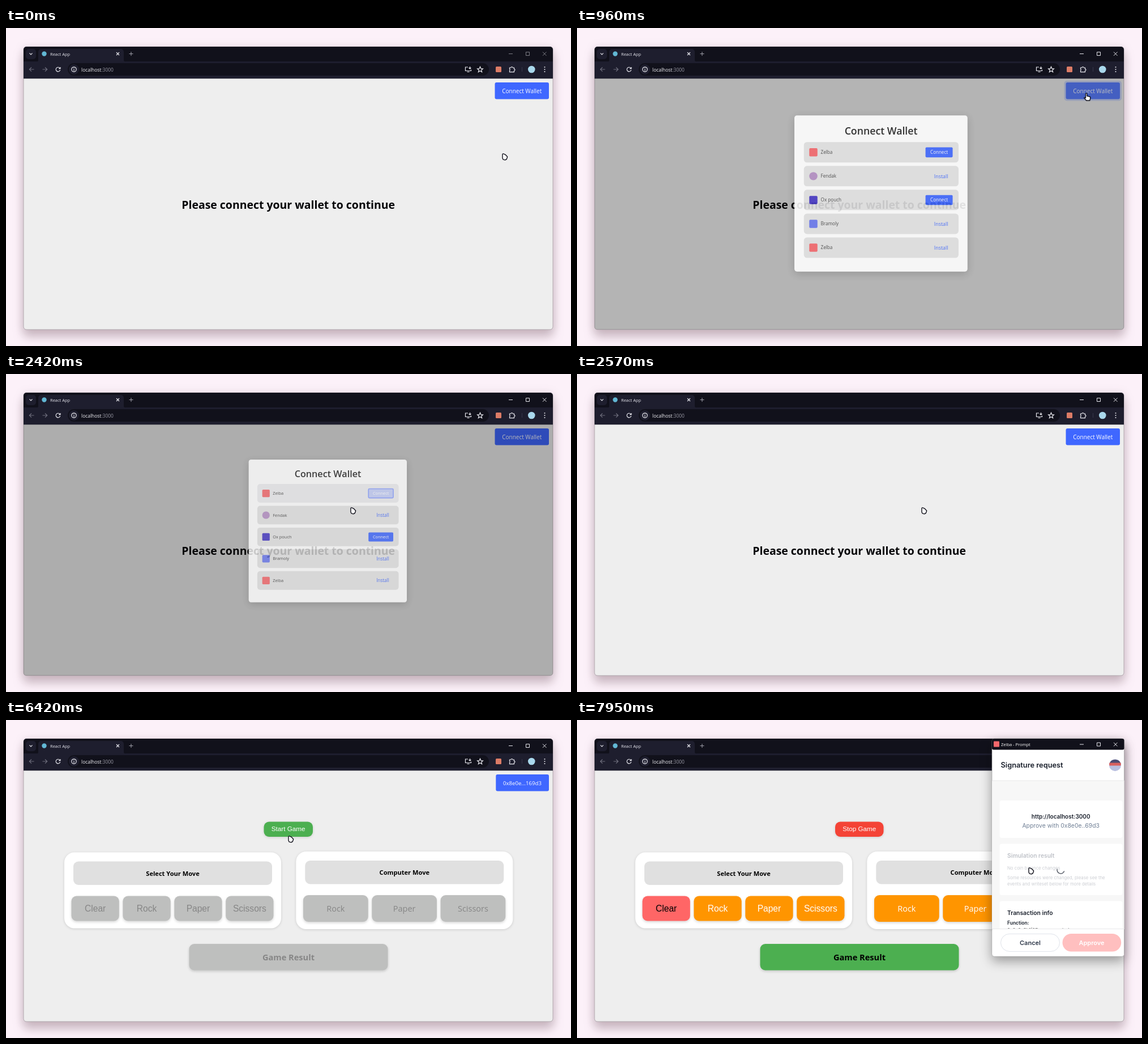
An HTML page for the animation above (8000 ms loop, 998x561 px).

```html
<!DOCTYPE html>
<html lang="en">
<head>
<meta charset="utf-8">
<title>Wallet game demo</title>
<style>
html, body { margin: 0; width: 100%; height: 100%; overflow: hidden; background: #fcf1f9; }
svg { display: block; width: 998px; height: 561px; }
text { font-family: "Open Sans", "Noto Sans", sans-serif; white-space: pre; }
.mid { text-anchor: middle; }
.bold { font-weight: 700; }
.semi { font-weight: 600; }
.arial { font-family: "Liberation Sans", Arial, sans-serif; }
#popup text { font-family: Inter, sans-serif; }
#popup .caption { font-family: "Open Sans", sans-serif; }
.line { fill: none; stroke: #e8e8ee; stroke-width: 1.2; }
.window { filter: drop-shadow(0 12px 9px rgba(80, 45, 60, .27)) drop-shadow(0 1px 8px rgba(70, 50, 60, .1)); }
.float { filter: drop-shadow(0 8px 10px rgba(0, 0, 0, .36)); }
.dialog { filter: drop-shadow(0 4px 8px rgba(0, 0, 0, .2)); }
.card { filter: drop-shadow(0 1px 2px rgba(0, 0, 0, .14)); }
.key { fill: #bebfbe; filter: drop-shadow(0 2px 2px rgba(0, 0, 0, .16)); }
.label { fill: #868686; }
.on .move { fill: #ff9500; }
.on .clear { fill: #ff6666; }
.on .result { fill: #4caf50; }
.on .label { fill: #fff; }
.on .dark { fill: #000; }
</style>
</head>
<body>
<svg id="stage" viewBox="0 0 998 561"></svg>
<script>
const BLUE = '#3f67ff';
const box = (x, y, w, h, r, fill, more = '') =>
  `<rect x="${x}" y="${y}" width="${w}" height="${h}" rx="${r}" fill="${fill}" ${more}/>`;
const text = (x, y, size, str, fill, cls = '', more = '') =>
  `<text x="${x}" y="${y}" font-size="${size}" fill="${fill}" class="${cls}" ${more}>${str}</text>`;
const path = (d, more = '') => `<path class="line" d="${d}" ${more}/>`;
const circle = (x, y, r, fill, more = '') => `<circle cx="${x}" cy="${y}" r="${r}" fill="${fill}" ${more}/>`;
const group = (id, ...parts) => `<g id="${id}">${parts.join('')}</g>`;

const controls = y => path(`M888 ${y}h7M918.5 ${y - 3}h6v6h-6zM948 ${y - 3.2}l6.5 6.5m0-6.5l-6.5 6.5`, 'style="stroke-width:1"');
const contentShape = 'M31 89H966V527a5 5 0 0 1-5 5H36a5 5 0 0 1-5-5Z';

const browser = [
  box(31, 33, 935, 499, 5, '#eee', 'class="window" stroke="#a59ca3" stroke-width=".8"'),
  '<path d="M31 60V38a5 5 0 0 1 5-5H961a5 5 0 0 1 5 5V60Z" fill="#11111b"/>',
  box(31, 59, 935, 30.3, 0, '#1e1e2e'),
  box(35, 37, 18, 18, 5, '#1e1e2e'),
  path('M41.5 44.3l2.5 2.5 2.5-2.5'),
  '<path d="M53 60q4 0 4-4V42a5 5 0 0 1 5-5H203a5 5 0 0 1 5 5V56q0 4 4 4Z" fill="#1e1e2e"/>',
  circle(67.5, 45.5, 4.2, '#62b8d4'),
  text(78, 48.5, 7.5, 'React App', '#e6e6ee'),
  path('M195 43l5 5m0-5l-5 5'),
  path('M221 42v7m-3.5-3.5h7', 'style="stroke:#a0a0ab;stroke-width:1"'),
  group('controls', controls(45.5)),
  path('M49.5 73h-8m3.5-3.7L41.3 73l3.7 3.7M64.5 73h8m-3.5-3.7l3.7 3.7-3.7 3.7', 'style="stroke:#6f6f7d"'),
  path('M95.3 71.2a3.8 3.8 0 1 0 .4 2.6M96 69v2.7h-2.8'),
  box(109, 62, 744, 22, 11, '#11111b'),
  circle(120, 73, 9, '#1e1e2e'),
  circle(120, 73, 4.2, 'none', 'class="line"'),
  path('M120 72.5v3M120 70.4v1.1'),
  text(133, 76.5, 8.45, 'localhost<tspan fill="#9a9aa6">:3000</tspan>', '#f0f0f5'),
  path('M816 69h-4.5v6.5h10v-2M814.5 77.5h4M819.5 68v4m-2-1.8l2 2 2-2'),
  path('M837.5 68.3l1.4 3.3 3.5.3-2.7 2.3.9 3.5-3.1-1.9-3.1 1.9.9-3.5-2.7-2.3 3.5-.3z'),
  box(865, 68, 10, 10, 1.5, '#dd7c66'),
  path('M889.5 70h2.5a1.5 1.5 0 0 1 3 0h2.5v2.3a1.5 1.5 0 0 1 0 3v2.3h-8v-2.5a1.5 1.5 0 0 0 0-2.6z'),
  path('M911.5 69v8', 'style="stroke:#343447"'),
  circle(928.3, 73, 6.3, '#a9d8ec'),
  [69, 73, 77].map(y => circle(951.5, y, 1, '#e8e8ee')).join('')
];

const welcome = group('welcome',
  group('ring', box(860.5, 93, 101.5, 35.5, 5, '#7f9bff')),
  box(863.5, 96, 95.5, 29.5, 3, BLUE, 'id="connect"'),
  text(911.2, 115, 10, 'Connect Wallet', '#fff', 'mid'),
  text(498.7, 319.3, 19.45, 'Please connect your wallet to continue', '#050508', 'mid bold'));

const wallets = [
  ['Zelba', '#f5686c', true], ['Fendak', '#b58fc4', false], ['Ox pouch', '#4537c4', true],
  ['Bramoly', '#6a78ee', false], ['Zelba', '#f5686c', false]
];
const walletRow = ([name, color, ready], i) => {
  const y = 210 + 46.5 * i;
  return box(348, y, 302, 39.8, 6, '#e3e3e3', `id="row${i}"`) +
    (i === 1 ? circle(366.5, y + 20, 8, color) : box(358.5, y + 12, 16, 16, 2, color)) +
    text(381, y + 23.2, 9, name, '#444') +
    (ready
      ? box(585.5, y + 10.3, 53, 19.5, 2, BLUE, `id="go${i}"`) + text(612, y + 23.2, 8.9, 'Connect', '#fff', 'mid')
      : text(616, y + 23.5, 9.8, 'Install', BLUE, 'mid'));
};
const modal = group('modal',
  box(329.5, 158, 338, 304.5, 5, '#fff', 'class="dialog"'),
  text(498.7, 195, 19.6, 'Connect Wallet', '#222', 'mid semi'),
  ...wallets.map(walletRow));

const key = (x, y, w, h, cls, label, size, font, tone = '') =>
  box(x, y, w, h, 9, '', `class="key ${cls}"`) +
  text(x + w / 2, y + h / 2 + size * .36, size, label, '', `mid label ${font} ${tone}`);
const panel = (x, y, h, title) =>
  box(x, y, 383, h, 18, '#fff', 'class="card"') + box(x + 16, y + 16, 351, 41.5, 9, '#e0e0e0') +
  text(x + 191.5, y + 41.2, 11.1, title, '#000', 'mid bold');
const moves = ['Rock', 'Paper', 'Scissors'];
const game = group('game',
  box(865.3, 96, 93.7, 29.5, 3, BLUE),
  text(912, 115, 9.65, '0x8e0e...169d3', '#fff', 'mid'),
  box(455.5, 179.5, 86.5, 26.5, 9, '#4caf50', 'id="toggle" class="card"'),
  text(498.7, 196.3, 11.7, 'Start Game', '#fff', 'mid arial', 'id="toggleText"'),
  panel(103, 233.5, 134, 'Select Your Move'),
  panel(512.3, 232, 137, 'Computer Move'),
  ...['Clear', ...moves].map((m, i) =>
    key(115.5 + 90.9 * i, 310.5, 84.3, 44, i ? 'move' : 'clear', m, 15.6, 'arial', i ? '' : 'dark')),
  ...moves.map((m, i) => key(525 + 121.3 * i, 309, 114.7, 47, 'move', m, 14.5, '')),
  key(323.5, 395, 351, 46.5, 'result', 'Game Result', 14.6, 'bold', 'dark'));

const faint = '#cdcfd4';
const popup = group('popup',
  box(733, 33, 233.5, 384, 4, '#fff', 'class="float" stroke="#999" stroke-width=".6"'),
  group('caption',
    box(733, 33, 233.5, 19.5, 3, '#11111b'),
    box(736, 37.5, 10, 10, 1, '#f5686c'),
    text(749, 45.6, 7.5, 'Zelba - Prompt', '#fff', 'caption'),
    controls(43)),
  group('sheet',
    box(733, 107, 233.5, 262, 0, '#f7f7f7'),
    box(733, 106.5, 233.5, 1, 0, '#e8e8ea'),
    circle(950.5, 79.7, 10.5, '#b9bfe0'),
    '<path d="M940.5 77a10.5 10.5 0 0 1 20 0z" fill="#4b4a70"/>',
    box(940.2, 75.5, 20.6, 5, 1, '#d9605f'),
    box(746.5, 142, 217, 66, 4, '#fff'),
    box(746.5, 218.5, 217, 90.5, 4, '#fff'),
    box(746.5, 319.5, 217, 60, 4, '#fff'),
    path('M-6.5 0A6.5 6.5 0 0 0 6.5 0', 'id="spinner" style="stroke:#555b66;stroke-width:1.5"')),
  group('copy',
    text(748.5, 84.4, 12.8, 'Signature request', '#1a202c', 'semi'),
    text(854.7, 174, 10, 'http://localhost:3000', '#1a202c', 'mid semi'),
    text(854.7, 190, 10.4, 'Approve with 0x8e0e..69d3', '#718096', 'mid'),
    text(760, 243, 10.3, 'Simulation result', '#bfc2c8', 'semi'),
    text(760, 264, 7.8, 'No coin balance changes', faint),
    text(760, 281, 7.8, 'Some resources were changed, please see the', faint),
    text(760, 292.3, 7.8, 'events and writeset below for more details', faint),
    text(760, 344.3, 10.3, 'Transaction info', '#1a202c', 'semi'),
    text(760, 361, 8.5, 'Function:', '#1a202c', 'semi'),
    text(760, 373, 8, '0x8e0e5b1f27ac::game::start_new_game', '#555')),
  group('actions',
    box(733.5, 368.5, 232.5, 48, 4, '#fff'),
    box(733, 368, 233.5, 1, 0, '#e8e8ea'),
    box(748.5, 377.3, 104, 31, 15.5, '#fff', 'stroke="#dfe3ea"'),
    box(857.5, 377, 103.7, 31.5, 15.7, '#ffbfbf')),
  group('actionText',
    text(800.5, 397, 11, 'Cancel', '#2d3748', 'mid semi'),
    text(909, 397, 11, 'Approve', '#fff', 'mid semi')));

const pointerStyle = 'fill="#fff" stroke="#10101a" stroke-width="1.4" stroke-linejoin="round"';
const cursor = group('cursor',
  `<path id="fist" d="M1 2Q1 .6 2.6 .9L6 2.3 9.7 6.2 8.3 10.3Q7 12 4.5 11.6L2 10.8 1 8.5Z" ${pointerStyle}/>`,
  `<path id="hand" d="M-.5 7.5V1Q.7-1.2 1.9 1V5L6.5 6Q8.2 6.5 7.8 9L6.7 13H.8L-3.2 8.5Q-2.8 6.8-.5 8.5Z" ${pointerStyle}/>`);

document.getElementById('stage').innerHTML = [
  ...browser, welcome, game,
  `<path id="shade" d="${contentShape}"/>`, modal, popup, cursor
].join('');

const $ = id => document.getElementById(id);
const set = (id, name, value) => $(id).setAttribute(name, value);
const show = (id, visible) => { $(id).style.display = visible ? '' : 'none'; };
const clamp = v => Math.max(0, Math.min(1, v));
const span = (t, start, length) => clamp((t - start) / length);
const smooth = p => p < .5 ? 4 * p ** 3 : 1 - (2 - 2 * p) ** 3 / 2;

function bezier(x1, y1, x2, y2) {
  const at = (a, b, u) => 3 * (1 - u) ** 2 * u * a + 3 * (1 - u) * u * u * b + u ** 3;
  return x => {
    let low = 0, high = 1;
    for (let i = 0; i < 20; i++) {
      const u = (low + high) / 2;
      if (at(x1, x2, u) < x) low = u; else high = u;
    }
    return at(y1, y2, high);
  };
}
const zoomIn = bezier(.08, .82, .17, 1);
const zoomOut = bezier(.78, .14, .15, .86);

const scaleAt = (x, y, s) => `translate(${x} ${y}) scale(${s}) translate(${-x} ${-y})`;

// Cursor trips: start time, duration, destination.
const trips = [[50, 730, 899, 115], [1060, 1040, 608, 235], [5620, 800, 498, 204], [7250, 480, 797, 260]];
function cursorAt(t) {
  let x = 876, y = 221;
  for (const [start, length, tx, ty] of trips) {
    const p = smooth(span(t, start, length));
    x += (tx - x) * p;
    y += (ty - y) * p;
  }
  return [x, y];
}

function render(t) {
  const playing = t >= 6940;
  show('welcome', t < 5080);
  show('game', t >= 5080);
  set('controls', 'opacity', t > 720 && t < 7030 ? 1 : .5);

  set('connect', 'fill', t > 680 && t < 1150 ? '#5a7dff' : BLUE);
  set('ring', 'opacity', t < 850 ? 0 : .45 * (1 - span(t, 850, 400)));

  // The dialog zooms out of the clicked button and back into it.
  const closing = t >= 2345;
  const zoom = closing ? 1 - zoomOut(span(t, 2345, 200)) : zoomIn(span(t, 899.6, 200));
  const fade = closing ? 1 - span(t, 2343, 200) : span(t, 853, 200);
  set('shade', 'opacity', .45 * fade);
  show('modal', zoom > .001);
  set('modal', 'opacity', zoom);
  set('modal', 'transform', scaleAt(901, 118, .2 + .8 * zoom));
  const pressed = t > 2270;
  set('row0', 'fill', pressed ? '#ececee' : '#e3e3e3');
  set('go0', 'fill', pressed ? '#c3cdf8' : BLUE);
  set('go0', 'stroke', pressed ? '#8aa0ff' : 'none');
  set('go0', 'stroke-width', 2);

  $('game').classList.toggle('on', playing);
  $('toggleText').textContent = playing ? 'Stop Game' : 'Start Game';
  const hover = t > 6450 && t < 7320;
  set('toggle', 'fill', playing ? (hover ? '#f4645b' : '#f44336') : hover ? '#62b866' : '#4caf50');
  set('toggle', 'x', playing ? 456 : 455.5);
  set('toggle', 'width', playing ? 85.5 : 86.5);

  const open = 1 - (1 - span(t, 7025, 250)) ** 2;
  show('popup', open > 0);
  set('popup', 'opacity', clamp(open * 1.9));
  set('popup', 'transform', scaleAt(849.5, 225, .91 + .09 * open));
  show('caption', t >= 7240);
  show('sheet', t >= 7560);
  show('actions', t >= 7560);
  show('copy', t >= 7790);
  show('actionText', t >= 7790);
  set('spinner', 'transform', `translate(854.5 264.5) rotate(${(t - 7950) * .8 + 18})`);

  const pointing = t > 680 && t < 1150 || t > 2060 && t < 2345 || hover;
  show('hand', pointing);
  show('fist', !pointing);
  set('cursor', 'transform', `translate(${cursorAt(t)})`);
}

function tick() {
  render(performance.now() % 8000);
  requestAnimationFrame(tick);
}
tick();
</script>
</body>
</html>
```
